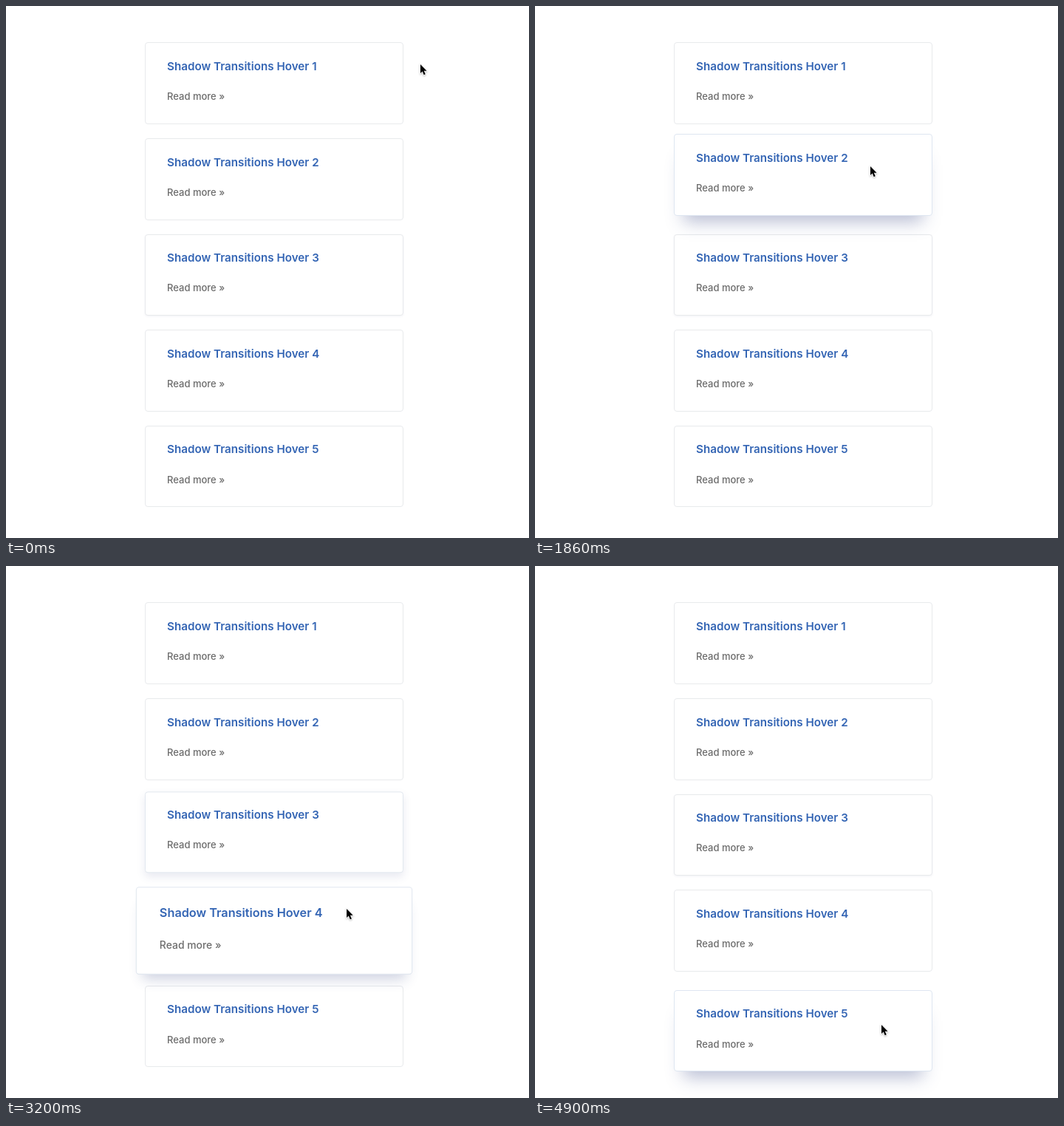
An HTML page for the animation above (5.38 s loop, 708 by 720 pixels).

```html
<!DOCTYPE html>
<html lang="en">
<head>
<meta charset="utf-8">
<title>Shadow Transitions Hover</title>
<style>
  html, body { margin: 0; width: 100%; height: 100%; overflow: hidden; background: #fff; }
  #stage { position: relative; width: 708px; height: 720px; overflow: hidden; }
  .card {
    position: absolute; left: 188px; width: 350px; height: 110.6px; box-sizing: border-box;
    border: 1px solid; border-radius: 4px; background: #fff;
    font-family: Inter, "Noto Sans", sans-serif; white-space: nowrap;
  }
  .card > * { position: absolute; left: 29px; margin: 0; line-height: 20px; }
  h2 { top: 21.6px; font-size: 15.2px; font-weight: 600; color: #3465b4; }
  p { top: 61.8px; font-size: 13px; font-weight: 500; color: #6c6c6c; }
  #cursor { position: absolute; left: 0; top: 0; overflow: visible; z-index: 9; }
</style>
</head>
<body>
<div id="stage">
  <svg id="cursor" width="12" height="18">
    <path d="M0 0V12L2.7 9.5L4.7 14.2L6.8 13.3L4.8 8.7H8.6Z" fill="#000" stroke="#fff"
      stroke-width="1.5" paint-order="stroke" style="filter:drop-shadow(0 1px 1px #0004)"/>
  </svg>
</div>
<script>
const LOOP = 5380, TOP = 49.4, STEP = 129.6, HEIGHT = 110.6, RIGHT = 538;
const stage = document.getElementById("stage");
const cursor = document.getElementById("cursor");

// Shadows: y offset, blur, spread, opacity
const flat = [0, 0, 0, 0];
const deep = [21, 22, -13, .34];

// Each card: when the pointer sets off for it, travel time, resting point, and its hover effect
const cards = [
  { start: 20, travel: 320, x: 461, y: 79, inMs: 350, outMs: 400, lift: -6, shadow: [4, 12, -2, .1] },
  { start: 1050, travel: 420, x: 454, y: 217, inMs: 370, outMs: 400, lift: -6, shadow: deep },
  { start: 1984, travel: 305, x: 469, y: 370, inMs: 190, outMs: 560, lift: -6, rest: [1, 3, 0, .07], shadow: [8, 18, 0, .14] },
  { start: 2992, travel: 243, x: 461, y: 466, inMs: 235, outMs: 250, lift: 0, grow: .1, shadow: deep },
  { start: 3971, travel: 412, x: 469, y: 621, inMs: 260, lift: 6, shadow: deep }
];

const clamp = v => Math.max(0, Math.min(1, v));
const mix = (a, b, k) => a + (b - a) * k;
const mixAll = (a, b, k) => a.map((v, i) => mix(v, b[i], k));
const easeOut = u => 1 - (1 - u) ** 2;
const cardTop = i => TOP + STEP * i;

// The CSS "ease" curve, solved by bisection
function ease(x) {
  if (x <= 0 || x >= 1) return clamp(x);
  const curve = (a, b, s) => 3 * a * s * (1 - s) ** 2 + 3 * b * s * s * (1 - s) + s ** 3;
  let low = 0, high = 1;
  for (let i = 0; i < 20; i++) {
    const mid = (low + high) / 2;
    if (curve(.25, .25, mid) < x) low = mid; else high = mid;
  }
  return curve(.1, 1, low);
}

// Moment at which the pointer, on its way to a card, passes an edge
function crossing(card, axis, edge) {
  const from = card.from[axis];
  const part = (edge - from) / (card[axis] - from);
  return card.start + card.travel * (1 - Math.sqrt(1 - part));
}

cards.forEach((card, i) => {
  card.from = cards[i - 1] || { x: 561, y: 79 };
  card.enter = i ? crossing(card, "y", cardTop(i)) : crossing(card, "x", RIGHT);
  if (i) card.from.leave = crossing(card, "y", cardTop(i - 1) + HEIGHT);

  card.el = document.createElement("div");
  card.el.className = "card";
  card.el.style.top = cardTop(i) + "px";
  card.el.innerHTML = `<h2>Shadow Transitions Hover ${i + 1}</h2><p>Read more »</p>`;
  stage.insertBefore(card.el, cursor);
});

function drawCard(card, t) {
  const { el, enter, leave, inMs, outMs, lift, grow = 0, rest = flat, shadow } = card;
  const left = leave ? ease((t - leave) / outMs) : 0;
  const k = ease((t - enter) / inMs) * (1 - left);
  const [y, blur, spread, alpha] = mixAll(rest, shadow, k);
  el.style.transform = k ? `translateY(${lift * k}px) scale(${1 + grow * k})` : "none";
  el.style.zIndex = k ? 1 : 0;
  el.style.borderColor = `rgb(${mixAll([232, 234, 236], [222, 230, 241], k)})`;
  el.style.boxShadow = `0 ${y}px ${blur}px ${spread}px rgba(50,65,130,${alpha})`;
}

function drawCursor(t) {
  const card = cards.findLast(c => t >= c.start) || cards[0];
  const k = easeOut(clamp((t - card.start) / card.travel));
  const x = mix(card.from.x, card.x, k), y = mix(card.from.y, card.y, k);
  cursor.style.transform = `translate(${x}px,${y}px)`;
}

const origin = performance.now();
function tick() {
  const t = (performance.now() - origin) % LOOP;
  cards.forEach(card => drawCard(card, t));
  drawCursor(t);
  requestAnimationFrame(tick);
}
tick();
</script>
</body>
</html>
```
